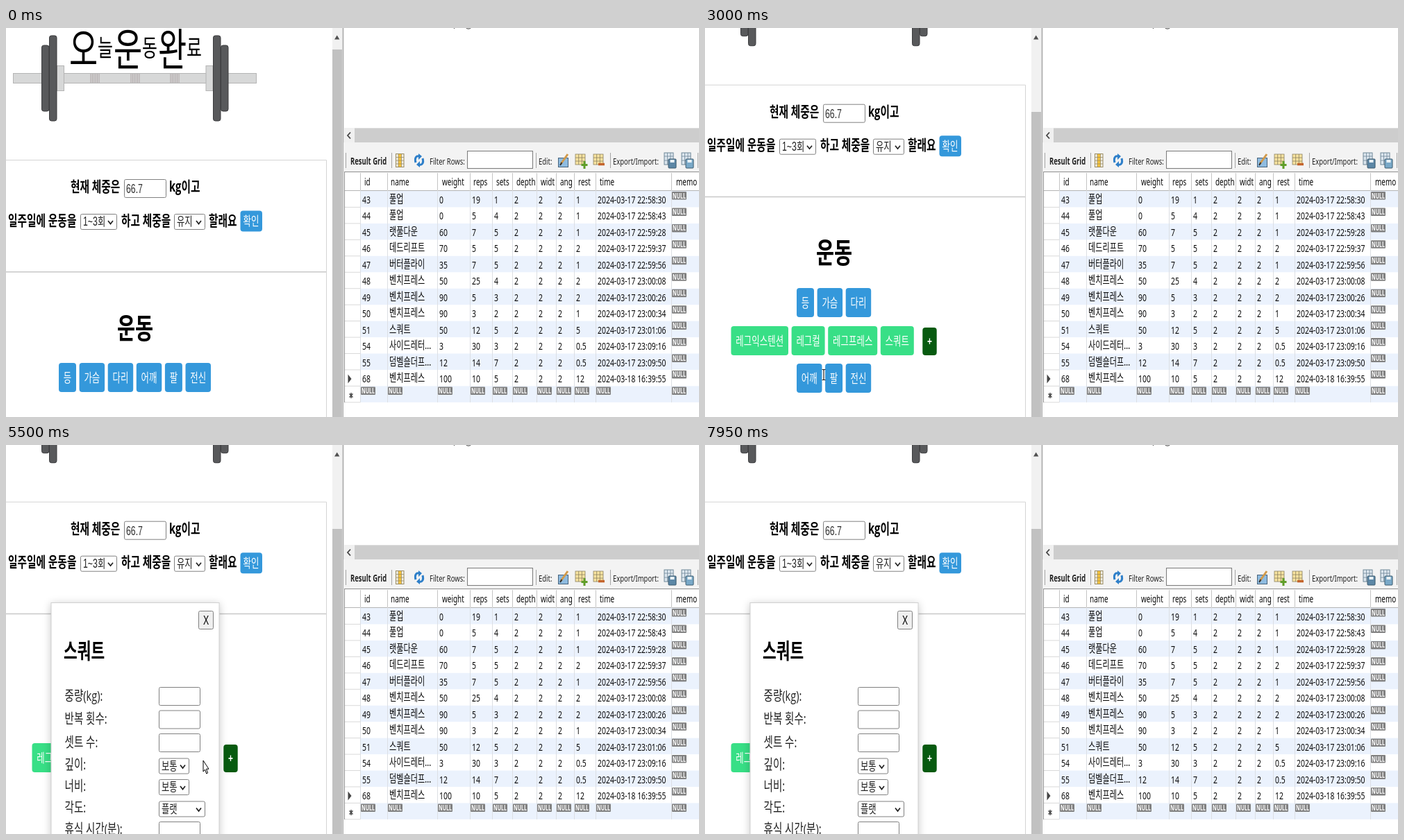
These frames come from a looping animation (998x561 px, 8 s). An HTML page:

```html
<!DOCTYPE html>
<html lang="ko">
<head>
<meta charset="utf-8">
<title>오늘운동완료</title>
<style>
  html, body { margin: 0; width: 100%; height: 100%; overflow: hidden; background: #fff; }
  svg { display: block; width: 998px; height: 561px; }
  text { white-space: pre; }
  .page { font-family: "Open Sans", "Noto Sans CJK KR", "Noto Sans CJK JP", sans-serif; }
  .control { font-family: "Liberation Sans", "Noto Sans CJK KR", "Noto Sans CJK JP", sans-serif; }
  .grid { font-family: "Noto Sans", "Noto Sans CJK KR", "Noto Sans CJK JP", sans-serif; }
  .modal { filter: drop-shadow(0 2px 6px rgba(0, 0, 0, .22)); }
</style>
</head>
<body>
<svg id="stage" viewBox="0 0 998 561"></svg>
<script>
const LOOP = 8000, OPEN_LIST = 2950, OPEN_MODAL = 5500, SCROLL = 108.3;
const SQUEEZE = 0.7;
const BLUE = '#3498db', GREEN = '#38df86';

const rect = (x, y, w, h, fill, extra = '') =>
  `<rect x="${x}" y="${y}" width="${w}" height="${h}" fill="${fill}" ${extra}/>`;
const path = (d, stroke, width = 1, fill = 'none') =>
  `<path d="${d}" stroke="${stroke}" stroke-width="${width}" fill="${fill}"/>`;
const text = (x, y, str, size, { cls = 'page', bold, mid, fill = '#000' } = {}) =>
  `<text transform="translate(${x} ${y}) scale(${SQUEEZE} 1)" font-size="${size}" class="${cls}" fill="${fill}"` +
  `${bold ? ' font-weight="700"' : ''}${mid ? ' text-anchor="middle"' : ''}>${str}</text>`;
const group = (id, body) => `<g id="${id}">${body}</g>`;

const box = (x, y, w, h, fill = '#fff') =>
  rect(x + .5, y + .5, w - 1, h - 1, fill, 'rx="2" stroke="#808080"');
const select = (x, y, w, label) => box(x, y, w, 23) +
  text(x + 4, y + 17, label, 17.6, { cls: 'control', fill: '#222' }) +
  path(`M${x + w - 13} ${y + 10}l3.5 4.5l3.5 -4.5`, '#222', 1.7);
const button = (x, y, label, fill) => {
  const w = 13.5 + 11.5 * label.length;
  return rect(x, y, w, 42, fill, 'rx="4"') +
    text(x + w / 2, y + 27.5, label, 17.8, { mid: true, fill: '#fff' });
};
const buttonRow = (x, y, labels, fill) => labels.split(' ').map(label => {
  const out = button(x, y, label, fill);
  x += 18.1 + 11.5 * label.length;
  return out;
}).join('');

function barbell() {
  const plate = (x, y, h) => rect(x + .5, y, 10.5, h, '#58595b', 'rx="3" stroke="#3c3d3f"');
  const steel = (x, y, w, h) => rect(x, y, w, h, '#d7d8d8', 'stroke="#b4b4b4"');
  let grips = '';
  for (const x of [122, 180, 237])
    for (let i = 0; i < 6; i++) grips += path(`M${x + i * 2.4} 66v13`, '#a99fa0', .9);
  return steel(10.5, 65.5, 350, 14) + grips + steel(73.5, 54.5, 10, 36) + steel(288, 54.5, 10, 36) +
    plate(51, 25, 95) + plate(62, 11, 123) + plate(298, 11, 123) + plate(309, 25, 95);
}

function title() {
  return [...'오늘운동완료'].map((ch, i) => {
    const x = 91 + 64 * (i >> 1);
    return i % 2 ? text(x + 41, 41, ch, 34) : text(x, 54, ch, 64);
  }).join('');
}

function pageBody() {
  const bold = (x, y, s) => text(x, y, s, 21, { bold: true });
  return barbell() + title() +
    path('M0 190.5H461.5V700', '#d4d4d4') + path('M0 351.8H461', '#c8c8c8', 1.6) +
    bold(93, 236, '현재 체중은') + box(170, 218, 61, 27) +
    text(173, 238, '66.7', 17.6, { cls: 'control', fill: '#333' }) + bold(235, 236, 'kg이고') +
    bold(3, 284.5, '일주일에 운동을') + select(107, 268, 53, '1~3회') +
    bold(166, 284.5, '하고 체중을') + select(242, 268, 45, '유지') + bold(292, 284.5, '할래요') +
    rect(337.5, 263.5, 31.5, 30, BLUE, 'rx="4"') + text(353, 285, '확인', 17.8, { mid: true, fill: '#fff' }) +
    text(186, 447.5, '운동', 40.5, { bold: true, mid: true });
}

function openList() {
  return buttonRow(132, 375, '등 가슴 다리', BLUE) +
    buttonRow(37.5, 430, '레그익스텐션 레그컬 레그프레스 스쿼트', GREEN) +
    rect(313.3, 432, 20.4, 40, '#075a10', 'rx="4"') +
    text(323.5, 457, '+', 17, { cls: 'control', bold: true, mid: true, fill: '#fff' }) +
    buttonRow(132, 484, '어깨 팔 전신', BLUE);
}

function modal() {
  const labels = ['중량(kg):', '반복 횟수:', '셋트 수:', '깊이:', '너비:', '각도:', '휴식 시간(분):'];
  const baselines = [369, 402, 436, 468, 499, 530, 561];
  return rect(65, 227.5, 242, 400, '#fff', 'class="modal" stroke="#d0d0d0"') +
    box(277, 239, 22, 27, '#efefef') +
    text(288, 259, 'X', 17.6, { cls: 'control', mid: true }) +
    text(83, 307.5, '스쿼트', 30.6, { bold: true }) +
    labels.map((s, i) => text(84.5, baselines[i], s, 20.8, { fill: '#222' })).join('') +
    [349, 382.5, 416, 543].map(y => box(220, y, 60, 27)).join('') +
    select(220, 451.5, 44, '보통') + select(220, 482, 44, '보통') + select(220, 513.5, 67, '플랫');
}

function scrollbar() {
  return rect(470, 0, 14, 561, '#f1f1f1') + path('M473 16.5L476.7 10.5L480.4 16.5Z', 'none', 0, '#505050') +
    group('thumb', rect(470, 0, 14, 561, '#c1c1c1'));
}

function toolbar() {
  const label = (x, s, bold) => text(x, 197, s, 13.5, { cls: 'grid', bold, fill: '#222' });
  const bars = [489.5, 555.5, 763.5, 870.5].map(x => path(`M${x} 180v22`, '#a5a5a5')).join('');
  const sheet = (x, w = 14) => rect(x, 182, w, 15, '#f7e3a0', 'stroke="#8b8060" stroke-width=".8"') +
    path(`M${x} 187h${w}m0 5h${-w}M${x + w / 3} 182v15m${w / 3} 0v-15`, '#8b8060', .8);
  const disk = (x, fill) => rect(x, 180, 13, 17, '#dce6ee', 'stroke="#6f8798"') +
    path(`M${x} 185h13m0 6h-13M${x + 4.5} 180v17m4.5 0v-17`, '#6f8798', .8) +
    rect(x + 6, 189, 11, 13, fill, 'rx="1" stroke="#39586d"') + rect(x + 8.5, 190, 6, 4, '#e9f1f5');
  return rect(486, 165, 512, 43, '#f3f3f3') + bars + label(496, 'Result Grid', true) +
    rect(561.5, 181.5, 11.5, 19, '#f0efe9', 'stroke="#9a8c62"') + rect(565, 182, 4.5, 18, '#f5c33c') +
    path('M561.5 186.5h11.5m0 4.7h-11.5m0 4.7h11.5M565 182v18m4.5 0v-18', '#9a8c62', .8) +
    path('M590 194c-2 -7 1 -10 5 -9M600 188c2 7 -1 10 -5 9', '#2e7fc9', 3) +
    path('M594 181l5 4l-5 5ZM596 201l-5 -4l5 -5Z', 'none', 0, '#2e7fc9') +
    label(610, 'Filter Rows:') + rect(664.5, 177.5, 94, 25, '#fff', 'stroke="#7a7a7a"') +
    label(767, 'Edit:') + rect(795.5, 187.5, 14, 13, '#8ebbe0', 'stroke="#47637c"') +
    path('M799 196l10 -14', '#d29a4a', 3) + path('M798 198l2.5 -4', '#333', 2) +
    sheet(820) + path('M833 192v11m-4.5 -5.5h9', '#5f9d28', 3) +
    sheet(846) + path('M853 196.5h9', '#c4642c', 3.5) +
    label(874, 'Export/Import:') + disk(948, '#5c87a6') + disk(973, '#7aa9c8') +
    path('M996.5 180v22', '#a5a5a5');
}

const RECORDS = `43|풀업|0|19|1|1|17 22:58:30
44|풀업|0|5|4|1|17 22:58:43
45|랫풀다운|60|7|5|1|17 22:59:28
46|데드리프트|70|5|5|2|17 22:59:37
47|버터플라이|35|7|5|1|17 22:59:56
48|벤치프레스|50|25|4|2|17 23:00:08
49|벤치프레스|90|5|3|2|17 23:00:26
50|벤치프레스|90|3|2|1|17 23:00:34
51|스쿼트|50|12|5|5|17 23:01:06
54|사이드레터...|3|30|3|0.5|17 23:09:16
55|덤벨숄더프...|12|14|7|0.5|17 23:09:50
68|벤치프레스|100|10|5|12|18 16:39:55`.split('\n').map(line => line.split('|'));

function resultGrid() {
  const PITCH = 23.45, TOP = 235;
  const heads = 'id name weight reps sets depth widt ang rest time memo'.split(' ');
  const headX = [516, 554, 628, 673, 706, 735, 770, 798, 824, 855, 965];
  const cellX = [513, 552, 624, 671, 703, 732, 767, 795, 821, 852, 961];
  const cell = (x, y, s, size = 14.9) => text(x, y, s, size, { cls: 'grid', fill: '#0c0c0c' });
  const badge = (x, row) => rect(x - 2, TOP + 1 + row * PITCH, 21, 11.5, '#808080', 'rx="1"') +
    text(x + 8.5, TOP + 10.5 + row * PITCH, 'NULL', 10, { cls: 'grid', bold: true, mid: true, fill: '#fff' });
  let out = rect(486, 208, 512, 353, '#fff');
  for (let i = 0; i <= 12; i++) {
    const y = TOP + i * PITCH;
    if (i % 2 === 0) out += rect(510, y, 488, PITCH, '#ebf2fd');
    out += path(`M487 ${y + PITCH}h23`, '#d9d9d9');
  }
  out += path('M487 207.5H998', '#8f8f8f') + path('M487 234.5H998', '#b4b4b4') + path('M487.5 208V540', '#8f8f8f');
  cellX.forEach((x, i) => {
    out += path(`M${x - 2.5} 209V540`, '#dcdfe4') + path(`M${x - 2.5} 209V234`, '#c4c4c4') +
      cell(headX[i], 227, heads[i], 14.2) + badge(x, 12);
  });
  RECORDS.forEach(([id, name, weight, reps, sets, rest, time], row) => {
    const y = TOP + 18 + row * PITCH;
    [id, name, weight, reps, sets, 2, 2, 2, rest, '2024-03-' + time].forEach((value, i) => {
      out += i === 1 ? cell(cellX[i], y - 1, value, 15.9) : cell(cellX[i], y, value);
    });
    out += badge(cellX[10], row);
  });
  return out + path('M492.5 499.5v13l5 -6.5Z', 'none', 0, '#444') +
    path('M497 526v8m-2.5 -6.5l5 5m0 -5l-5 5', '#444', 1.4);
}

function rightPane() {
  return rect(484, 0, 514, 561, '#fff') + rect(484, 0, 3, 561, '#e4e4e4') + path('M485.3 0V561', '#a0a0a0') +
    path('M645.5 0v1M663 0c1 1.5 5 1.5 6 0', '#555', 1.2) +
    rect(487, 144, 511, 21, '#f0f0f0') + rect(502, 144.5, 496, 20.5, '#cdcdcd') +
    path('M496 150.5l-4 4.5l4 4.5', '#444', 1.8) + toolbar() + resultGrid();
}

const CURSORS = {
  arrow: path('M0 0V16L2.6 13L4.7 19L6.5 18L4.6 12.2H8Z', '#000', 1, '#fff'),
  hand: path('M-1.3 1.2Q0 -1 1.3 1.2V7.5L5.5 8.5Q7.3 9 7.2 11.5L6.2 19H-.8L-4 12.5Q-4 10 -1.3 12Z', '#000', 1, '#fff') +
    path('M1.3 7.5v3m2.3 -2.4v2.6', '#000', .8),
  beam: path('M-2.5 -7.5H-.7L0 -6.8L.7 -7.5H2.5M0 -7V7M-2.5 7.5H-.7L0 6.8L.7 7.5H2.5', '#222', 1.2),
  move: path('M0 0L3 4H1V8H4V6L7 10L4 14V12H1V16H3L0 20L-3 16H-1V12H-4V14L-7 10L-4 6V8H-1V4H-3Z', '#333', .9, '#fff'),
};

// time, x, y, shape held from that time on
const TRACK = [
  [0, 172, 570, ''], [1100, 172, 557, 'move'], [1200, 172, 552, 'move'], [1550, 172, 552, 'arrow'],
  [1800, 140, 520, 'hand'], [2050, 98, 498, 'hand'], [2400, 125, 512, 'hand'], [2450, 125, 512, 'hand'],
  [2800, 171, 500, 'hand'], [2950, 171, 500, 'beam'], [3550, 171, 500, 'arrow'],
  [3750, 210, 470, 'hand'], [3950, 232, 446, 'hand'], [4400, 121, 455, 'hand'], [4550, 106, 448, 'hand'],
  [4800, 173, 457, 'hand'], [5000, 238, 464, 'hand'], [5200, 284, 455, 'hand'], [5500, 284, 455, 'arrow'],
  [5850, 284, 455, 'arrow'], [6150, 245, 454, 'arrow'], [6400, 226, 451, 'arrow'],
  [6600, 226, 424, 'beam'], [7150, 226, 424, 'arrow'], [7350, 240, 447, 'arrow'],
  [7600, 320, 320, 'arrow'], [7900, 444, 72, 'arrow'], [7950, 444, 72, ''], [8000, 444, 72, ''],
];

const $ = id => document.getElementById(id);
$('stage').innerHTML = group('body', pageBody()) +
  group('closed', buttonRow(76, 483, '등 가슴 다리 어깨 팔 전신', BLUE)) +
  group('opened', openList()) + group('modal', modal()) + scrollbar() + rightPane() +
  group('pointer', Object.entries(CURSORS).map(([name, shape]) => group(name, shape)).join(''));

const show = (id, on) => $(id).setAttribute('display', on ? 'inline' : 'none');
const moveTo = (id, x, y) => $(id).setAttribute('transform', `translate(${x} ${y})`);

function render(time) {
  const t = Math.floor((time % LOOP) / 50) * 50;
  const open = t >= OPEN_LIST;
  moveTo('body', 0, open ? -SCROLL : 0);
  moveTo('thumb', 0, open ? 121 : 31);
  show('closed', !open);
  show('opened', open);
  show('modal', t >= OPEN_MODAL);

  const i = TRACK.findIndex((key, n) => n + 1 < TRACK.length && t < TRACK[n + 1][0]);
  const [t0, x0, y0, shape] = TRACK[i], [t1, x1, y1] = TRACK[i + 1];
  const k = (t - t0) / (t1 - t0);
  moveTo('pointer', x0 + (x1 - x0) * k, y0 + (y1 - y0) * k);
  for (const name in CURSORS) show(name, name === shape);
}

let start;
function tick(now) {
  start ??= now;
  render(now - start);
  requestAnimationFrame(tick);
}
render(0);
requestAnimationFrame(tick);
</script>
</body>
</html>
```
